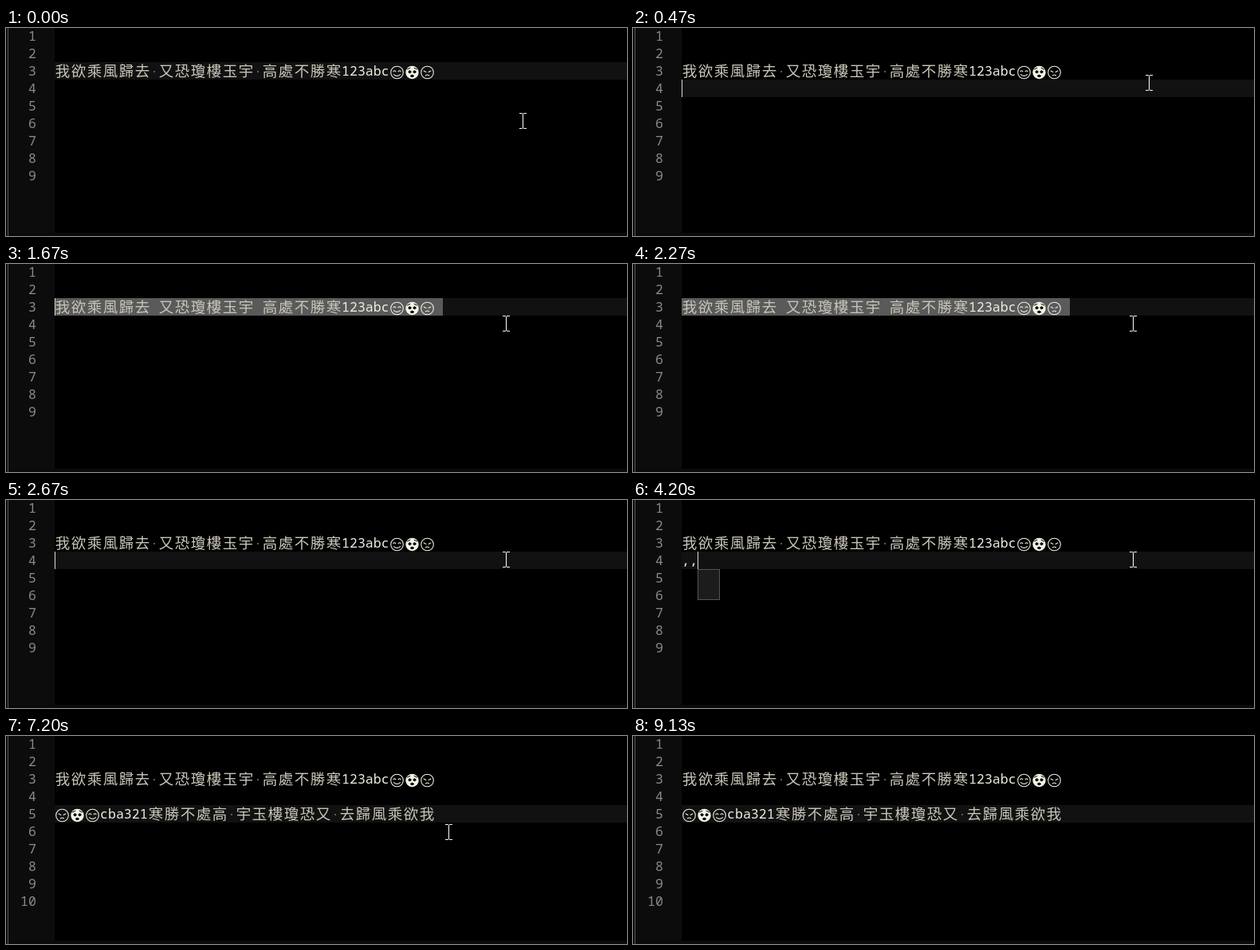
Recreate the animation shown at these times as an HTML page. Size 779 by 262 pixels, loop 9340 ms.

```html
<!DOCTYPE html>
<html lang="zh-Hant">
<head>
<meta charset="utf-8">
<title>Reversed line</title>
<style>
  html, body { margin: 0; width: 100%; height: 100%; overflow: hidden; background: #000; }
  svg { display: block; width: 779px; height: 262px; }
  text { white-space: pre; }
  .num, .latin { font: 500 16.6px "Noto Sans Mono", monospace; }
  .num { fill: #8a8a8a; text-anchor: end; }
  .latin { fill: #eeece2; }
  .han { font: 300 18.5px "Noto Sans CJK TC", "Noto Sans CJK", "Noto Sans CJK JP", sans-serif;
         letter-spacing: 1.5px; fill: #c9c5b8; }
  .line { fill: none; stroke: #eeeee2; stroke-width: 1.1; stroke-linecap: round; }
  .solid { fill: #f2f2e4; }
  .ink { fill: #000; stroke: #000; stroke-linecap: round; }
</style>
</head>
<body>
<svg viewBox="0 0 779 262">
  <defs>
    <g id="smile" class="line">
      <circle r="7.8"/>
      <path d="M-4.6 -1.2q1.5 -2 3 0M1.6 -1.2q1.5 -2 3 0M-4 2.6q4 3.6 8 0"/>
    </g>
    <g id="fear">
      <circle r="8.2" class="solid"/>
      <path class="ink" fill-opacity="0" d="M-6 -4l3.4 -1.6M6 -4l-3.4 -1.6"/>
      <circle class="ink" cx="-3" cy="-.8" r="1.5"/>
      <circle class="ink" cx="3" cy="-.8" r="1.5"/>
      <ellipse class="ink" cy="4.4" rx="2" ry="1.2"/>
    </g>
    <g id="angry" class="line">
      <circle r="7.8"/>
      <path d="M-4.4 -2l2.8 1.4M4.4 -2l-2.8 1.4M-2 3.8q2 -1.6 4 0"/>
    </g>
  </defs>
  <rect width="61" height="262" fill="#0c0c0c"/>
  <rect y="258" width="779" height="4" fill="#0a0a0a"/>
  <rect x="2" width="1" height="262" fill="#5c5c5c"/>
  <rect id="band" x="61" width="718" height="22" fill="#111"/>
  <rect id="pick" height="22" fill="#5a5a5a"/>
  <g id="numbers"></g>
  <g id="first"></g>
  <g id="second"></g>
  <text id="typed" class="latin" x="61"></text>
  <rect id="popup" width="27" height="38" fill="#1c1c1c" stroke="#555"/>
  <rect id="caret" width="1" height="22" fill="#dcdccc"/>
  <path id="mouse" d="M-4 -10h4v1h1v-1h4v1h-4v18h4v1h-4v-1h-1v1h-4v-1h4v-18h-4z"
        fill="#fff" shape-rendering="crispEdges"/>
</svg>
<script>
const LOOP = 9340, TICK = 200 / 3, BLINK = 600;
const LEFT = 61, RIGHT = 537;
const $ = id => document.getElementById(id);
const rowTop = n => 22 * n - 23;

function add(parent, tag, attrs, text = "") {
  const el = document.createElementNS("http://www.w3.org/2000/svg", tag);
  for (const k in attrs) el.setAttribute(k, attrs[k]);
  el.textContent = text;
  parent.append(el);
}

// Hides the element when attrs is falsy.
function place(id, attrs) {
  const el = $(id);
  el.style.display = attrs ? "" : "none";
  for (const k in attrs || {}) el.setAttribute(k, attrs[k]);
}

// Runs: "#name" is a face, " " a marked space, the rest is text.
function layLine(parent, row, runs) {
  let x = LEFT;
  const top = rowTop(row);
  for (const run of runs) {
    if (run[0] === "#") {
      add(parent, "use", { href: run, x: x + 9.5, y: top + 13 });
      x += 19;
    } else if (run === " ") {
      add(parent, "rect", { class: "dot", x: x + 4, y: top + 11, width: 2, height: 2, fill: "#5c5c5c" });
      x += 10;
    } else {
      const latin = run.charCodeAt(0) < 128;
      add(parent, "text", latin ? { class: "latin", x, y: top + 17 }
                                : { class: "han", x: x + 0.75, y: top + 17.5 }, run);
      x += run.length * (latin ? 10 : 20);
    }
  }
}

const words = ["我欲乘風歸去", " ", "又恐瓊樓玉宇", " ", "高處不勝寒", "123abc", "#smile", "#fear", "#angry"];
const flip = run => run[0] === "#" ? run : [...run].reverse().join("");
layLine($("first"), 3, words);
layLine($("second"), 5, words.map(flip).reverse());
for (let n = 1; n <= 10; n++)
  add($("numbers"), "text", { class: "num", x: 38, y: rowTop(n) + 17 }, n);

// What the user does; each state holds until the next.
const actions = [
  { at: 0, row: 3 },
  { at: 470, row: 4, caret: LEFT },
  { at: 530, row: 3, caret: RIGHT, pick: RIGHT + 1, since: 470 },
  { at: 1670, row: 3, caret: LEFT, pick: LEFT },
  { at: 2670, row: 4, caret: LEFT },
  { at: 3730, row: 4, typed: "," },
  { at: 4200, row: 4, typed: ",," },
  { at: 5130, row: 5, caret: RIGHT, done: true },
  { at: 9130, row: 5, done: true }
];

// Pointer stops as [tick, x, y], joined by straight moves.
const stops = [[0, 648, 117], [1, 632, 99], [3, 632, 99], [5, 647, 69],
               [7, 647, 69], [8, 647, 64], [9, 647, 64], [12, 627, 75]];
const EXIT = 104;

function pointer(tick) {
  const s = Math.max(0, tick - EXIT);
  const next = stops.findIndex(p => p[0] > tick);
  // After the last stop it rests, then speeds up down and to the left.
  if (next < 0) return [627 - 13.5 * s - 1.125 * s * s, 75 + 0.5 * s + 2.75 * s * s];
  const [a, x0, y0] = stops[next - 1], [b, x1, y1] = stops[next];
  const k = (tick - a) / (b - a);
  return [x0 + k * (x1 - x0), y0 + k * (y1 - y0)];
}

function draw(t) {
  const now = actions.findLast(a => a.at <= t);
  const top = rowTop(now.row);
  const typed = now.typed || "";
  const typedEnd = LEFT + 10 * typed.length;

  const [mx, my] = pointer(Math.floor(t / TICK + 0.06)).map(Math.round);
  place("mouse", { transform: `translate(${mx} ${my})` });

  const lit = Math.floor((t - (now.since ?? now.at)) / BLINK) % 2 === 0;
  const caretX = typed ? typedEnd : lit && now.caret;
  place("caret", caretX && { x: caretX, y: top });
  place("band", { y: top });
  place("pick", now.pick && { x: now.pick, y: top, width: RIGHT + 11 - now.pick });

  place("typed", { y: top + 17 });
  $("typed").textContent = typed;
  place("popup", typed && { x: typedEnd + 0.5, y: top + 22.5 });

  for (const dot of $("first").querySelectorAll(".dot"))
    dot.style.display = now.pick === LEFT ? "none" : "";
  place("second", now.done && {});
  $("numbers").lastChild.style.display = now.done ? "" : "none";
}

const began = performance.now();
function tick() {
  draw((performance.now() - began) % LOOP);
  requestAnimationFrame(tick);
}
tick();
</script>
</body>
</html>
```
